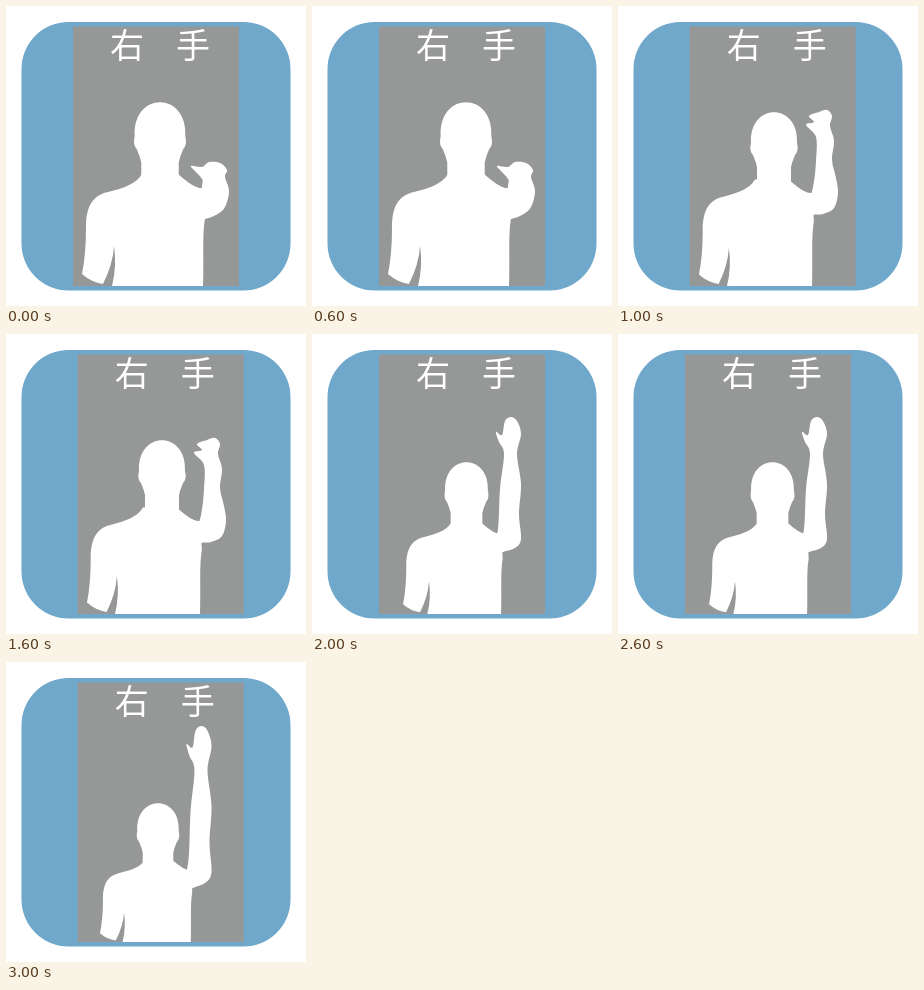
These frames come from a looping animation (300 px wide and 300 px high, 4000 ms). An HTML page:

```html
<!DOCTYPE html>
<html lang="zh">
<head>
<meta charset="utf-8">
<style>
  html, body { margin: 0; width: 100%; height: 100%; overflow: hidden; background: #fff; }
  svg { display: block; width: 100%; height: 100%; }
  text { font: 34px "Noto Sans CJK SC", "Noto Sans CJK JP", "Noto Sans CJK", sans-serif; }
</style>
</head>
<body>
<svg viewBox="0 0 300 300">
  <rect x="15.5" y="16" width="269" height="268.5" rx="47" fill="#6fa8cb"/>
  <g id="panel">
    <rect x="67" y="20.5" width="166" height="259.5" fill="#969897"/>
    <g fill="#fff"><text x="104" y="52">右</text><text x="170" y="52">手</text></g>
  </g>
  <g fill="#fff">
    <path id="head" d="M-17 70V55Q-18 50 -21 43Q-25 39 -23 31C-25 -10 25 -10 23 31Q25 39 21 43Q18 50 17 55V70Z"/>
    <path id="torso" d="M136 168C130 178 118 182 102 186C84 190 80 204 80 222Q80 248 76 268Q85 276 97 278Q107 258 108 240Q111 260 106 280H197C198 250 196 230 199 212L197 182Q190 184 172 168Z"/>
    <path id="arm"/>
  </g>
</svg>
<script>
  const bent = [[190, 215], [196, 180], [196, 173], [190, 166], [185, 160], [196, 161], [203, 156],
    [214, 157], [221, 164], [219, 171], [223, 185], [219, 201], [210, 209], [199, 213]];
  const raised = [[186, 214], [195, 181], [198, 155], [198, 131], [188, 119], [196, 116], [191, 110],
    [201, 106], [209, 104], [214, 110], [212, 120], [216, 135], [214, 154], [218, 172], [220, 187],
    [216, 202], [205, 208], [195, 209]];
  const straight = [[180, 222], [186, 195], [188, 155], [192, 120], [187, 108], [184, 98], [190, 101],
    [193, 87], [199, 83], [205, 87], [209, 100], [205, 120], [209, 150], [207, 180], [209, 205],
    [203, 214], [191, 218]];

  // Closed Catmull-Rom curve through the points
  function smooth(points) {
    const at = i => points[(i + points.length) % points.length];
    const handle = (i, side) => at(i).map((v, k) => v + side * (at(i + 1)[k] - at(i - 1)[k]) / 6);
    return "M" + at(0) + points.map((_, i) =>
      "C" + [handle(i, 1), handle(i + 1, -1), at(i + 1)].join(" ")).join("") + "Z";
  }

  const place = (x, y, sx = 1, sy = sx) => `translate(${x} ${y}) scale(${sx} ${sy})`;
  const poses = [
    { arm: bent, head: place(154, 96, 1.1), torso: place(0, 0), reach: place(0, 0) },
    { arm: raised, head: place(156, 106), torso: place(10, 14, 0.934, 0.95), reach: place(0, 0) },
    { arm: straight, head: place(154.5, 128, 0.93), torso: place(29.5, 50.4, 0.81, 0.82), reach: place(0, 0) },
    { arm: straight, head: place(152, 141, 0.9), torso: place(37, 74.5, 0.75, 0.734), reach: place(-3.5, -35.3, 1, 1.197) }
  ];

  const set = (id, name, value) => document.getElementById(id).setAttribute(name, value);

  function draw() {
    const step = Math.floor(performance.now() / 1000) % poses.length;
    const pose = poses[step];
    set("panel", "transform", place(step % 2 * 4.7, 0));
    set("head", "transform", pose.head);
    set("torso", "transform", pose.torso);
    set("arm", "transform", pose.reach);
    set("arm", "d", smooth(pose.arm));
    requestAnimationFrame(draw);
  }
  draw();
</script>
</body>
</html>
```
